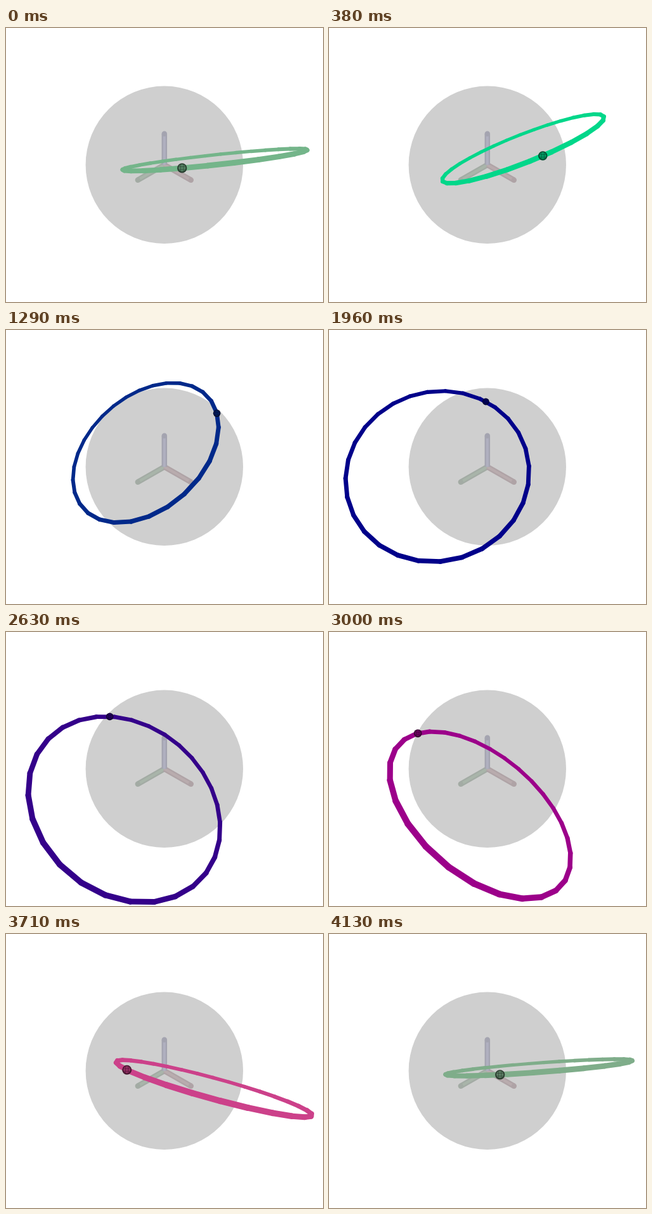
Recreate the animation shown at these times as an HTML page with a canvas. Size 500 px wide and 432 px high, loop 4.18 s.

```html
<!DOCTYPE html>
<html lang="en">
<head>
<meta charset="utf-8">
<title>Hopf fibre</title>
<style>
  html, body { margin: 0; width: 100%; height: 100%; overflow: hidden; background: #fff; }
  canvas { display: block; }
</style>
</head>
<body>
<canvas id="stage" width="500" height="432"></canvas>
<script>
const ctx = document.getElementById('stage').getContext('2d');
const TAU = 2 * Math.PI;
const LOOP = 4180, STEPS = 100, STEP_MS = 125 / 3;

// Camera on the diagonal (1,1,1), 45 degree field of view
const CX = 249.8, CY = 215.7, FOCAL = 521.5, DIST = Math.sqrt(18.75);
const SIN_E = 1 / Math.sqrt(3), COS_E = Math.sqrt(2 / 3);

// Fibre: circle of radius R whose centre lies C from the origin
const HEIGHT = Math.cos(1), REACH = Math.sin(1);
const C = HEIGHT / REACH, R = 1 / REACH;
const SEGMENTS = 29, TUBE = 0.056, BALL = 0.049;

// Azimuth is measured from the camera direction towards the right
function project(az, radius, z) {
  const right = radius * Math.sin(az), front = radius * Math.cos(az);
  return view(right, front, z);
}

function view(right, front, z) {
  const scale = FOCAL / (DIST - front * COS_E - z * SIN_E);
  return {
    x: CX + right * scale,
    y: CY - (z * COS_E - front * SIN_E) * scale,
    scale
  };
}

function fibrePoint(psi, t) {
  const along = C + R * Math.cos(t);
  const across = R * Math.sin(t) * REACH;
  return view(
    along * Math.sin(psi) + across * Math.cos(psi),
    along * Math.cos(psi) - across * Math.sin(psi),
    -R * Math.sin(t) * HEIGHT
  );
}

function line(a, b, width, style, cap) {
  ctx.lineWidth = width;
  ctx.strokeStyle = style;
  ctx.lineCap = cap;
  ctx.beginPath();
  ctx.moveTo(a.x, a.y);
  ctx.lineTo(b.x, b.y);
  ctx.stroke();
}

function disc(p, radius, fill) {
  ctx.fillStyle = fill;
  ctx.beginPath();
  ctx.arc(p.x, p.y, radius, 0, TAU);
  ctx.fill();
}

function axis(tip, edge, core) {
  const o = { x: CX, y: CY };
  line(o, tip, 8.5, edge, 'butt');
  line(o, tip, 4, core, 'butt');
  disc(tip, 4.2, edge);
}

function drawBall(p, rgb) {
  const r = BALL * p.scale;
  const shade = k => `rgb(${rgb.map(v => Math.round(v * k))})`;
  disc(p, r, shade(0.35));
  disc({ x: p.x, y: p.y - r * 0.05 }, r * 0.74, shade(0.72));
  for (const side of [-1, 1]) {
    line({ x: p.x - r * 0.6, y: p.y + side * r * 0.3 },
         { x: p.x + r * 0.6, y: p.y + side * r * 0.3 }, 0.8, shade(0.42), 'round');
    line({ x: p.x + side * r * 0.3, y: p.y - r * 0.6 },
         { x: p.x + side * r * 0.3, y: p.y + r * 0.6 }, 0.8, shade(0.42), 'round');
  }
}

function draw(step) {
  const theta = 1 + step / STEPS * TAU;
  const phi = theta - TAU / 8, psi = phi + TAU / 4;
  const rgb = [REACH * Math.cos(theta), REACH * Math.sin(theta), HEIGHT]
    .map(v => Math.round(255 * Math.max(0, v)));

  ctx.fillStyle = '#fff';
  ctx.fillRect(0, 0, 500, 432);
  disc({ x: CX, y: CY }, 124.2, '#cfcfcf');
  axis({ x: CX - 42, y: CY + 24 }, '#a3aba4', '#a9b5aa');
  axis({ x: CX + 42, y: CY + 24 }, '#afa3a6', '#b9acae');
  axis({ x: CX, y: CY - 49 }, '#a4a4b0', '#b0b0c0');

  const points = [];
  for (let k = 0; k <= SEGMENTS; k++) {
    points.push(fibrePoint(psi, k / SEGMENTS * TAU - TAU / 8 - psi));
  }
  for (let k = 0; k < SEGMENTS; k++) {
    const a = points[k], b = points[k + 1];
    line(a, b, TUBE * (a.scale + b.scale) / 2, `rgb(${rgb})`, 'round');
  }
  drawBall(project(phi, REACH, HEIGHT), rgb);
}

function tick() {
  const t = performance.now() % LOOP;
  draw(Math.min(STEPS - 1, Math.floor((t + 4.9) / STEP_MS)));
  requestAnimationFrame(tick);
}
tick();
</script>
</body>
</html>
```
